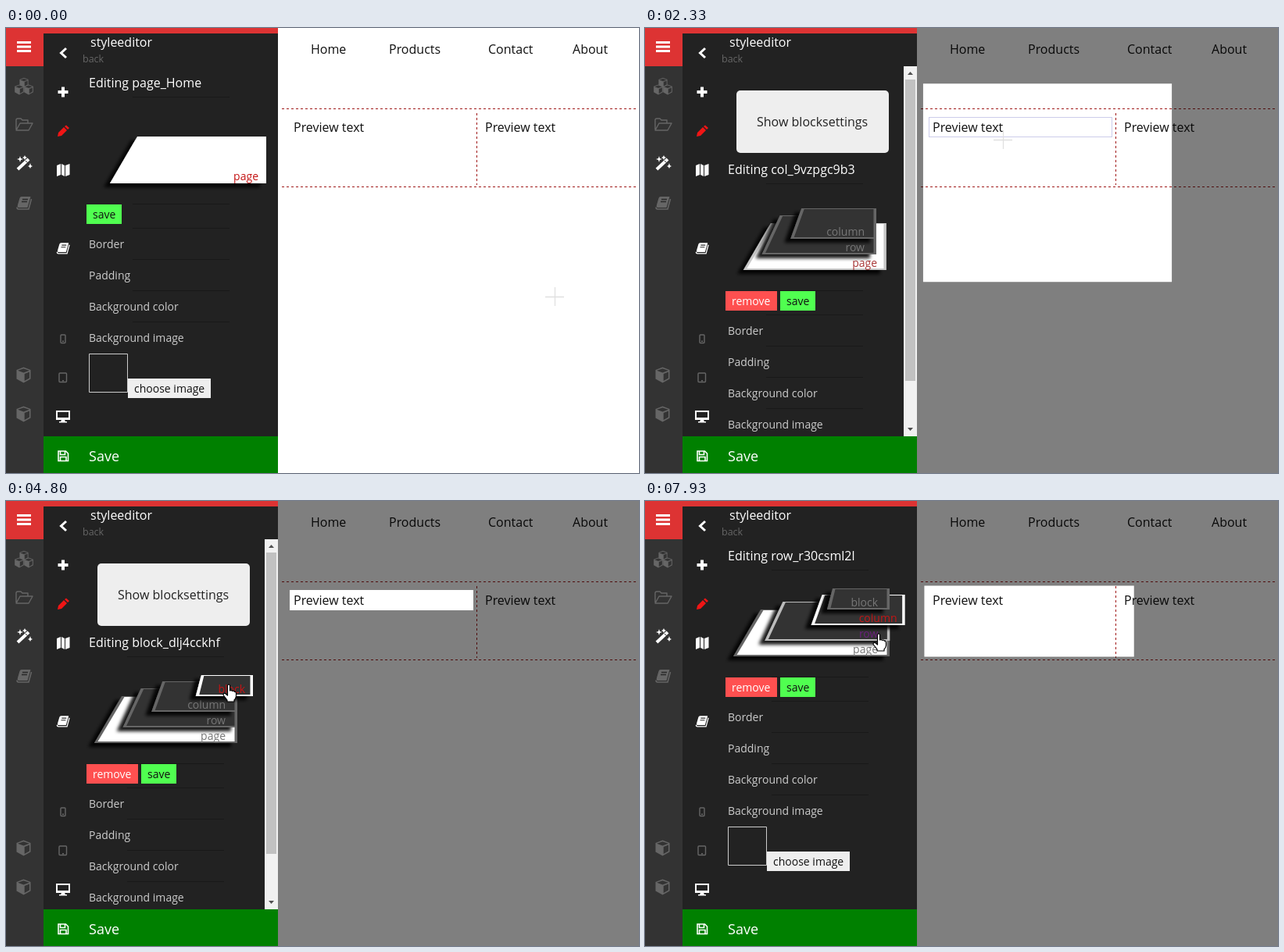
Recreate the animation shown at these times as an HTML page. Size 810 by 570 pixels, loop 8000 ms.

```html
<!DOCTYPE html>
<html lang="en">
<head>
<meta charset="utf-8">
<title>Style editor</title>
<style>
html, body { margin: 0; width: 100%; height: 100%; overflow: hidden; background: #fff; }
svg { display: block; font: 16px "Open Sans", sans-serif; }
.small { font-size: 14px; }
.w { fill: #fff; }
.line { fill: none; stroke: #666; stroke-width: 1.4; stroke-linejoin: round; }
.dash { fill: none; stroke: #a01818; stroke-dasharray: 3 3; }
</style>
</head>
<body>
<svg width="810" height="570" viewBox="0 0 810 570">
  <defs>
    <filter id="shadow" x="-20%" y="-30%" width="140%" height="180%">
      <feDropShadow dx="-8" dy="5" stdDeviation="2" flood-color="#000" flood-opacity=".9"/>
    </filter>
    <g id="cube">
      <path d="M0-10 9-6.500V5L0 10-9 5V-6.500Z" fill="#666"/>
      <path d="M-7.500-5.800 0-8.300 7.500-5.800 0-3Z" fill="#333"/>
      <path d="M1.200-1.500 7.500-4V4L1.200 7.500Z" fill="#333"/>
    </g>
    <g id="book">
      <path d="M-3-8H8.500L4.500 6H-6.500Q-9 6-8 2.500L-5.500-6Q-5-8-3-8Z"/>
      <path d="M9.500-5 6 8H-7Q-9 8-9 5.500" fill="none" stroke="currentColor" stroke-width="1.500"/>
      <path d="M-2-4.500H5M-3-1.500H4" stroke="#2a2a2a" stroke-width="1.300"/>
    </g>
  </defs>

  <g fill="#111">
    <text x="390" y="33">Home</text>
    <text x="490" y="33">Products</text>
    <text x="617" y="33">Contact</text>
    <text x="725" y="33">About</text>
    <text x="368" y="133">Preview text</text>
    <text x="613" y="133">Preview text</text>
  </g>
  <path class="dash" d="M353 103.500H808M353 203.500H808M602.500 109V201"/>
  <rect id="outline" x="363.500" y="114.500" width="234" height="25" fill="none" stroke="#ccccea"/>
  <path id="overlay" fill-opacity=".5" fill-rule="evenodd"/>

  <path fill="#222" d="M48 0H348V570H48Z"/>
  <g id="seps" fill="#191919"></g>
  <text id="title" class="w" x="106"></text>
  <g id="stack"></g>
  <g id="form" class="small">
    <g id="remove">
      <path fill="#ff5050" d="M103 226H169V251H103Z"/>
      <text class="w" x="111" y="244">remove</text>
    </g>
    <g id="save">
      <path fill="#50ff50" d="M103 226H148V251H103Z"/>
      <text x="111" y="244" fill="#111">save</text>
    </g>
    <g fill="#ccc">
      <text x="106" y="282">Border</text>
      <text x="106" y="322">Padding</text>
      <text x="106" y="362">Background color</text>
      <text x="106" y="402">Background image</text>
    </g>
    <path d="M106.500 417.500H155.500V466.500H106.500Z" fill="none" stroke="#ccc"/>
    <path fill="#eee" d="M156 449H262V474H156Z"/>
    <text x="164" y="467" fill="#111">choose image</text>
  </g>
  <g id="block">
    <rect x="117" y="80" width="195" height="80" rx="5" fill="#eee"/>
    <text x="143" y="126" fill="#222">Show blocksettings</text>
    <path fill="#f1f1f1" d="M331 49H348V523H331Z"/>
    <path id="thumb" d="M333 66H346V452H333Z"/>
    <path fill="#505050" d="M336 60 339.500 56 343 60ZM336 512 339.500 516 343 512Z"/>
  </g>

  <path fill="#dd3333" d="M48 0H348V7H48Z"/>
  <text class="w" x="108" y="24">styleeditor</text>
  <text x="98" y="44" font-size="12.500" fill="#666">back</text>
  <path fill="#008000" d="M48 523H348V570H48Z"/>
  <text class="w" x="106" y="555" font-size="18">Save</text>

  <path fill="#333" d="M0 0H48V570H0Z"/>
  <path fill="#dd3333" d="M0 0H48V49H0Z"/>
  <path class="w" d="M14 17H32V20H14ZM14 22.500H32V25.500H14ZM14 28H32V31H14Z"/>
  <use href="#cube" transform="translate(23 70) scale(.62)"/>
  <use href="#cube" transform="translate(17 79) scale(.65)"/>
  <use href="#cube" transform="translate(29 79) scale(.65)"/>
  <path class="line" d="M13 130V118Q13 116 15 116H19L21 118H28V122M13 131 18 122H34L29 131Z"/>
  <path d="M15 181 29 168" stroke="#fff" stroke-width="4"/>
  <path d="M25 170 28 173" stroke="#333"/>
  <path class="w" d="M18 164 19 167 22 168 19 169 18 172 17 169 14 168 17 167ZM24 163 25 165 27 166 25 167 24 169 23 167 21 166 23 165ZM31 173 32 176 34 177 32 178 31 180 30 178 28 177 30 176Z"/>
  <use href="#book" x="23" y="224" fill="#666" color="#666"/>
  <use href="#cube" x="22.500" y="444.500"/>
  <use href="#cube" x="22.500" y="494.500"/>

  <path d="M77 26 70.500 32 77 38" fill="none" stroke="#fff" stroke-width="3"/>
  <path class="w" d="M71 75.500H75V80H79.500V84H75V88.500H71V84H66.500V80H71Z"/>
  <path fill="#f01515" d="M66 139 67 134 74 127 78 131 71 138ZM75 126 77 124.500 81 128 79 130Z"/>
  <path class="w" d="M65 176 70 174V188L65 190ZM71 174 75 176V190L71 188ZM76 176 81.500 174V188L76 190Z"/>
  <use href="#book" transform="translate(73 282) scale(.85)" fill="#fff" color="#fff"/>
  <rect class="line" x="70" y="393" width="6" height="10.500" rx="1"/>
  <rect class="line" x="68" y="442" width="9.500" height="11.500" rx="1"/>
  <path fill="#666" d="M72 400.500H74V402H72ZM72 451H74V452.500H72Z"/>
  <path class="w" fill-rule="evenodd" d="M64 490H82V502H75L76 504H78V505.500H68V504H70L71 502H64ZM66 492V499H80V492Z"/>
  <path d="M67 542H76.500L79.500 545V554.500H67ZM69.500 542V546.500H75.500V542M69.500 554V549.500H77V554" fill="none" stroke="#fff" stroke-width="1.600"/>

  <path id="cross" d="M-12 .500H12M.500-12V12" stroke="#e0e0e0" stroke-width="1.300"/>
  <path id="hand" d="M-1.500 1Q0-1 1.500 1V8L3 7.500Q4 7.500 4.500 8.500L6 8Q7 8.500 7.300 9.300L8.500 9Q9.500 10 9.500 12V15Q9 18 7 20V22H-2V20L-7 13.500Q-7 11-4.500 11.500L-1.500 14Z" fill="#fff" stroke="#000" stroke-width="1.200" stroke-linejoin="round"/>
</svg>
<script>
const LOOP = 8000;
const $ = id => document.getElementById(id);
const show = (id, on) => { $(id).style.display = on ? '' : 'none'; };
const clamp = x => Math.max(0, Math.min(1, x));
const lerp = (a, b, p) => a + (b - a) * p;
const smooth = x => x * x * (3 - 2 * x);
const ramp = (t, start, length = 400) => smooth(clamp((t - start) / length));
const easeOut = x => 1 - (1 - x) ** 3;
const mix = (a, b, p) => `color-mix(in srgb, ${a}, ${b} ${p * 100}%)`;

const PANEL = 348;
const cursorPath = [
  [0, 702, 344], [130, 702, 344], [530, 477, 147], [1600, 477, 147], [1800, 458, 143],
  [2800, 458, 143], [2930, 479, 146], [3670, 479, 146], [4130, 287, 274], [4270, 287, 274],
  [4330, 285, 235], [4800, 285, 235], [5200, 288, 274], [5600, 283, 258], [6800, 283, 258],
  [7600, 299, 168], [7800, 299, 168], [7930, 299, 170], [LOOP, 299, 170]
];
// Start time, then left, top, right and bottom of the lit area.
const spots = [
  [0, 352, 0, 810, 565], [2212, 358, 109, 602, 198], [3171, 363, 114, 598, 140],
  [6048, 358, 109, 602, 199], [7915, 353, 104, 808, 203]
];
const titles = [[0, 'page_Home'], [2200, 'col_9vzpgc9b3'], [3200, 'block_dlj4cckhf'],
  [6070, 'col_9vzpgc9b3'], [7930, 'row_r30csml2l']];

const levels = [
  { name: 'page', height: 60, skew: 35, fill: '#fff', from: 0,
    picked: t => 1 - ramp(t, 2170), hover: [7250, 7450] },
  { name: 'row', height: 50, skew: 23, fill: '#333', from: 2200,
    picked: t => ramp(t, 7900), hover: [7550, 9000] },
  { name: 'column', height: 39, skew: 14, fill: '#333', from: 2200,
    picked: t => ramp(t, 2340, 260) - ramp(t, 3150) + ramp(t, 6070) - ramp(t, 7900), hover: [5650, 6350] },
  { name: 'block', height: 27, skew: 7, fill: '#333', from: 3200,
    picked: t => ramp(t, 3150) - ramp(t, 6070), hover: [4280, 4900] }
];

function make(tag, parent, attrs = {}) {
  const node = document.createElementNS('http://www.w3.org/2000/svg', tag);
  for (const key in attrs) node.setAttribute(key, attrs[key]);
  return parent.appendChild(node);
}

for (const level of levels) {
  level.group = make('g', $('stack'));
  level.frame = make('path', level.group, { filter: 'url(#shadow)' });
  level.inner = make('path', level.group, { fill: level.fill });
  level.label = make('text', level.group, { class: 'small', 'text-anchor': 'end' });
  level.label.textContent = level.name;
}
for (const y of [88, 225, 256, 296, 336, 376]) make('rect', $('seps'), { x: 162, y, width: 124, height: 1 });

const lastBefore = (list, t) => list.findLastIndex(item => item[0] <= t);

function drawStack(t, right, dy) {
  levels.forEach((level, i) => {
    level.group.style.display = t >= level.from ? '' : 'none';
    const s = level.picked(t);
    const [on, off] = level.hover;
    const h = ramp(t, on, 150) - ramp(t, off, 150);
    const x1 = right + 20 * s;
    const x0 = x1 - (right - 113) * (1 - .2 * i);
    const bottom = 199 - 20 * i + dy;
    const top = bottom - level.height;
    const { skew } = level;
    level.frame.setAttribute('d', `M${x0 + skew} ${top}H${x1}V${bottom}H${x0}Z`);
    level.inner.setAttribute('d', `M${x0 + skew + 3.5} ${top + 1}H${x1 - 3.5}V${bottom - 2}H${x0 + 4.5}Z`);
    level.frame.style.fill = mix(mix('#666', '#bbb', h), '#fff', s);
    level.label.style.fill = mix(mix('#777', '#6a2080', h), '#c41414', s);
    level.label.setAttribute('x', right - 15 + 25 * s);
    level.label.setAttribute('y', bottom - 4);
  });
}

function drawOverlay(t) {
  show('overlay', t >= 2200);
  const i = lastBefore(spots, t);
  const p = easeOut(clamp((t - spots[i][0]) / 400));
  const from = spots[Math.max(0, i - 1)];
  const [, l, top, r, b] = spots[i].map((v, k) => lerp(from[k], v, p));
  $('overlay').setAttribute('d', `M${PANEL} 0H810V570H${PANEL}ZM${l} ${top}H${r}V${b}H${l}Z`);
}

function drawCursor(t) {
  const i = Math.min(lastBefore(cursorPath, t), cursorPath.length - 2);
  const [t0, xa, ya] = cursorPath[i];
  const [t1, xb, yb] = cursorPath[i + 1];
  const p = smooth((t - t0) / (t1 - t0));
  const x = lerp(xa, xb, p), y = lerp(ya, yb, p);
  const inPanel = x < PANEL;
  show('cross', !inPanel);
  show('hand', inPanel);
  $(inPanel ? 'hand' : 'cross').setAttribute('transform', `translate(${Math.round(x)} ${Math.round(y)})`);
  $('thumb').style.fill = inPanel && x > 331 ? '#a8a8a8' : '#c1c1c1';
}

function draw() {
  const t = performance.now() % LOOP;
  const withBlock = (t >= 2200 && t < 2460) || (t >= 3200 && t < 6300);
  const dy = withBlock ? 111 : 0;
  show('block', withBlock);
  show('outline', t >= 330 && t < 3735);
  show('remove', t >= 2200);
  $('save').setAttribute('transform', `translate(${t >= 2200 ? 70 : 0} 0)`);
  $('form').setAttribute('transform', `translate(0 ${dy})`);
  $('seps').setAttribute('transform', `translate(${withBlock ? -7 : 0} ${dy})`);
  $('title').textContent = 'Editing ' + titles[lastBefore(titles, t)][1];
  $('title').setAttribute('y', 76 + dy);
  drawStack(t, withBlock ? 296 : 313, dy);
  drawOverlay(t);
  drawCursor(t);
  requestAnimationFrame(draw);
}
draw();
</script>
</body>
</html>
```
